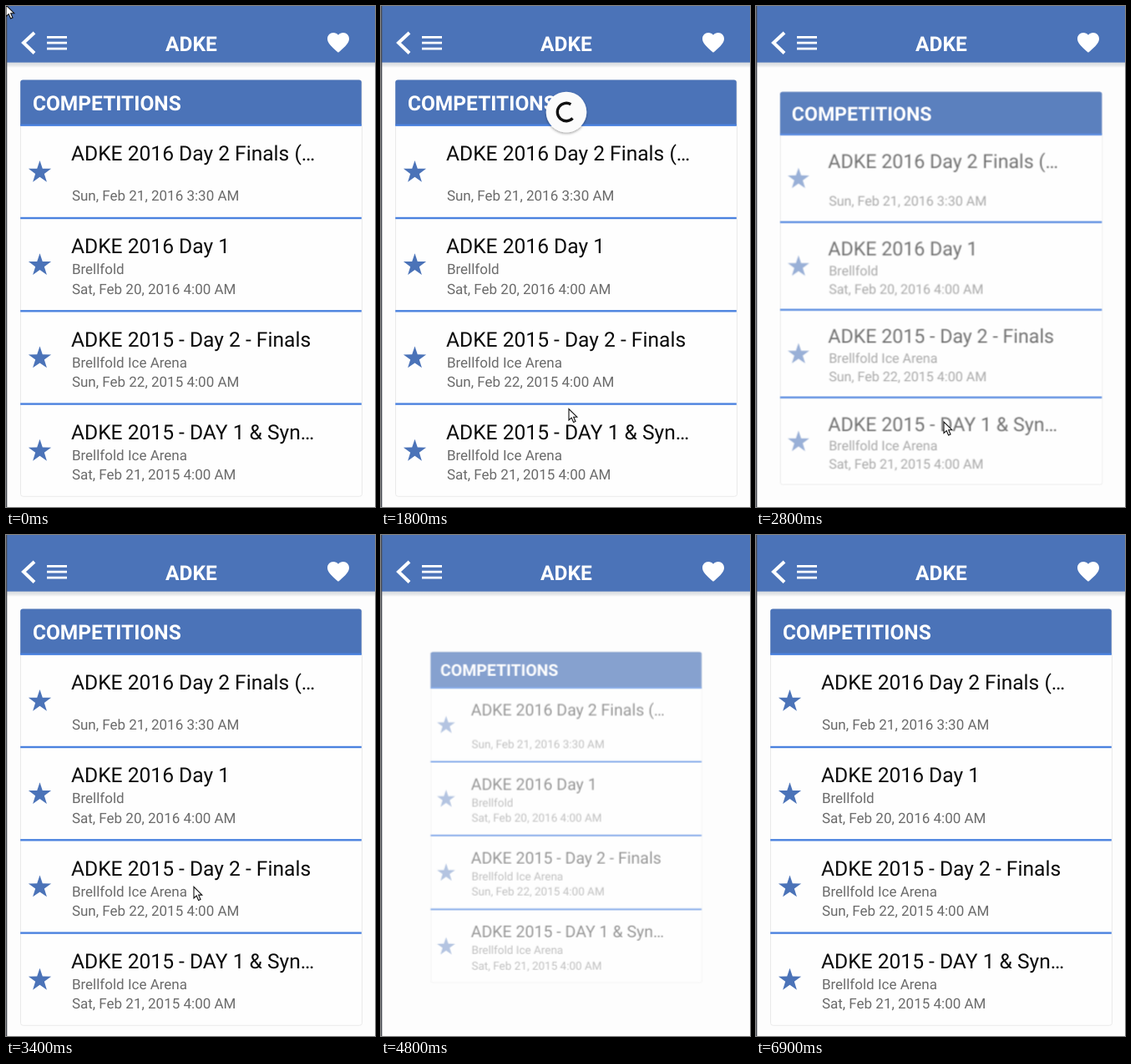
Recreate the animation shown at these times as an HTML page. Size 442 px wide and 600 px high, loop 7000 ms.

```html
<!DOCTYPE html>
<html lang="en">
<head>
<meta charset="utf-8">
<title>Pull to refresh</title>
<style>
  html, body { margin: 0; width: 100%; height: 100%; overflow: hidden; background: #fdfdfd; }
  svg { display: block; width: 442px; height: 600px; font-family: Roboto, sans-serif; text-rendering: geometricPrecision; }
  .bold { font-size: 24.5px; font-weight: 700; fill: #fff; }
  .title { font-size: 24.6px; fill: #0a0a0a; }
  .detail { font-size: 17px; fill: #6b6b6b; }
</style>
</head>
<body>
<svg viewBox="0 0 442 600">
  <defs>
    <linearGradient id="shade" x2="0" y2="1">
      <stop stop-color="#d3d7dd"/>
      <stop offset=".6" stop-color="#e6e8ea"/>
      <stop offset="1" stop-color="#fdfdfd"/>
    </linearGradient>
    <filter id="lift" x="-30%" y="-30%" width="160%" height="160%">
      <feDropShadow dx="0" dy="1.5" stdDeviation="1.8" flood-opacity=".35"/>
    </filter>
  </defs>
  <rect width="442" height="600" fill="#fdfdfd"/>

  <g id="card">
    <rect x="17.5" y="89" width="409" height="498.3" rx="3" fill="#fefefe" stroke="#eaeaea"/>
    <path d="M17.2 143V91.5q0-3 3-3h402.6q3 0 3 3v51.5z" fill="#4b73b8"/>
    <text class="bold" x="31.9" y="125">COMPETITIONS</text>
    <g id="lines" fill="#4b82df"></g>
    <g id="rows"></g>
  </g>

  <g id="spinner">
    <circle r="24.3" fill="#fbfbfb" filter="url(#lift)"/>
    <path id="arc" fill="none" stroke-width="3.4"/>
  </g>

  <rect y="67" width="442" height="7" fill="url(#shade)"/>
  <rect width="442" height="67.6" fill="#4b73b8"/>
  <path d="M34 32L21 44L34 56.5" fill="none" stroke="#fff" stroke-width="4"/>
  <path d="M49 37.3h24M49 44.2h24M49 51.1h24" stroke="#fff" stroke-width="2.8"/>
  <text class="bold" x="191" y="54">ADKE</text>
  <path transform="translate(382.4 28.1) scale(1.3)" fill="#fff"
    d="M12 21.35l-1.45-1.32C5.4 15.36 2 12.28 2 8.5 2 5.42 4.42 3 7.5 3c1.74 0 3.41.81 4.5 2.09C13.09 3.81 14.76 3 16.5 3 19.58 3 22 5.42 22 8.5c0 3.78-3.4 6.86-8.55 11.54z"/>
  <rect width="1.3" height="600" fill="#4a4d55"/>

  <path id="cursor" d="M0 0V13.5L3.2 10.6L5.6 16L8 15L5.7 9.7H9.8Z" fill="#fff" stroke="#111" stroke-width="1.1"/>
</svg>
<script>
const LOOP = 7000, STEP = 100, ROW_HEIGHT = 111.3;
const REFRESHES = [2229, 4395];
const OUT = 250, IN_DELAY = 255, IN = 500, SHRINK = 0.42;
const CURSOR_PATH = [[0, 0, -1], [900, 225, 255], [1250, 225, 255], [1900, 225, 498],
                     [3250, 225, 498], [3650, 225, 256], [3750, 225, 256], [4250, 225, 620]];
const SPINNERS = [
  { start: 1300, rest: 1800, leave: 2400, dark: 1700 },
  { start: 3800, rest: 4250, leave: 4400, dark: 4350 }
];

const $ = id => document.getElementById(id);
const clamp = v => Math.min(1, Math.max(0, v));
const progress = (t, from, to) => clamp((t - from) / (to - from));
const smooth = p => p * p * (3 - 2 * p);

const star = Array.from({ length: 10 }, (_, i) => {
  const r = i % 2 ? 5.6 : 14.3, a = (i / 5 - 0.5) * Math.PI;
  return `${(40.5 + r * Math.cos(a)).toFixed(2)},${(199.2 + r * Math.sin(a)).toFixed(2)}`;
}).join(' ');

const competitions = [
  ['ADKE 2016 Day 2 Finals (…', '', 'Sun, Feb 21, 2016 3:30 AM'],
  ['ADKE 2016 Day 1', 'Brellfold', 'Sat, Feb 20, 2016 4:00 AM'],
  ['ADKE 2015 - Day 2 - Finals', 'Brellfold Ice Arena', 'Sun, Feb 22, 2015 4:00 AM'],
  ['ADKE 2015 - DAY 1 &amp; Syn…', 'Brellfold Ice Arena', 'Sat, Feb 21, 2015 4:00 AM']
];
$('lines').innerHTML = competitions.map((_, i) =>
  `<rect x="17.2" y="${141.5 + i * ROW_HEIGHT}" width="408.6" height="2.4"/>`).join('');
$('rows').innerHTML = competitions.map(([title, place, date], i) => `
  <g transform="translate(0 ${i * ROW_HEIGHT})">
    <polygon points="${star}" fill="#4b73b8"/>
    <text class="title" x="78" y="185">${title}</text>
    <text class="detail" x="78.9" y="210">${place}</text>
    <text class="detail" x="78.9" y="233.3">${date}</text>
  </g>`).join('');

function drawCard(t) {
  let shrink = 0, rowOpacity = 1;
  for (const start of REFRESHES) {
    const age = t - start;
    if (age < 0 || age > IN_DELAY + IN) continue;
    if (age < IN_DELAY) {
      shrink = clamp(age / OUT) ** 2;
    } else {
      const p = (age - IN_DELAY) / IN;
      shrink = (1 - p) ** 2;
      rowOpacity = 0.62 + 0.38 * progress(p, 0.65, 1);
    }
  }
  const scale = 1 - SHRINK * shrink;
  $('card').setAttribute('transform', `translate(222 338.5) scale(${scale}) translate(-222 -338.5)`);
  $('card').setAttribute('opacity', 1 - 1.6 * (1 - scale));
  $('rows').setAttribute('opacity', rowOpacity);
}

function drawSpinner(t) {
  const s = SPINNERS.find(s => t >= s.start && t < s.leave + 200);
  $('spinner').style.display = s ? '' : 'none';
  if (!s) return;
  const y = 40 + 87 * smooth(progress(t, s.start, s.rest));
  const size = 1 - progress(t, s.leave, s.leave + 200);
  const dark = t >= s.dark;
  const from = (-135 + (dark ? (t - 2300) * 0.36 : (t - 4300) * 0.3)) * Math.PI / 180;
  const to = from + (dark ? 255 : 280) * Math.PI / 180;
  const point = a => `${10.7 * Math.cos(a)} ${10.7 * Math.sin(a)}`;
  $('spinner').setAttribute('transform', `translate(222 ${y}) scale(${size})`);
  $('arc').setAttribute('d', `M${point(from)}A10.7 10.7 0 1 1 ${point(to)}`);
  $('arc').setAttribute('stroke', dark ? '#111' : '#a3a3a3');
}

function drawCursor(t) {
  const next = CURSOR_PATH.findIndex(k => k[0] > t);
  $('cursor').style.display = next < 0 ? 'none' : '';
  if (next < 0) return;
  const [t0, x0, y0] = CURSOR_PATH[next - 1], [t1, x1, y1] = CURSOR_PATH[next];
  const p = smooth(progress(t, t0, t1));
  $('cursor').setAttribute('transform', `translate(${x0 + (x1 - x0) * p} ${y0 + (y1 - y0) * p})`);
}

const origin = performance.now();
function frame() {
  const elapsed = (performance.now() - origin) % LOOP;
  const t = Math.floor(elapsed / STEP) * STEP;
  drawCard(t);
  drawSpinner(t);
  drawCursor(t);
  requestAnimationFrame(frame);
}
frame();
</script>
</body>
</html>
```
